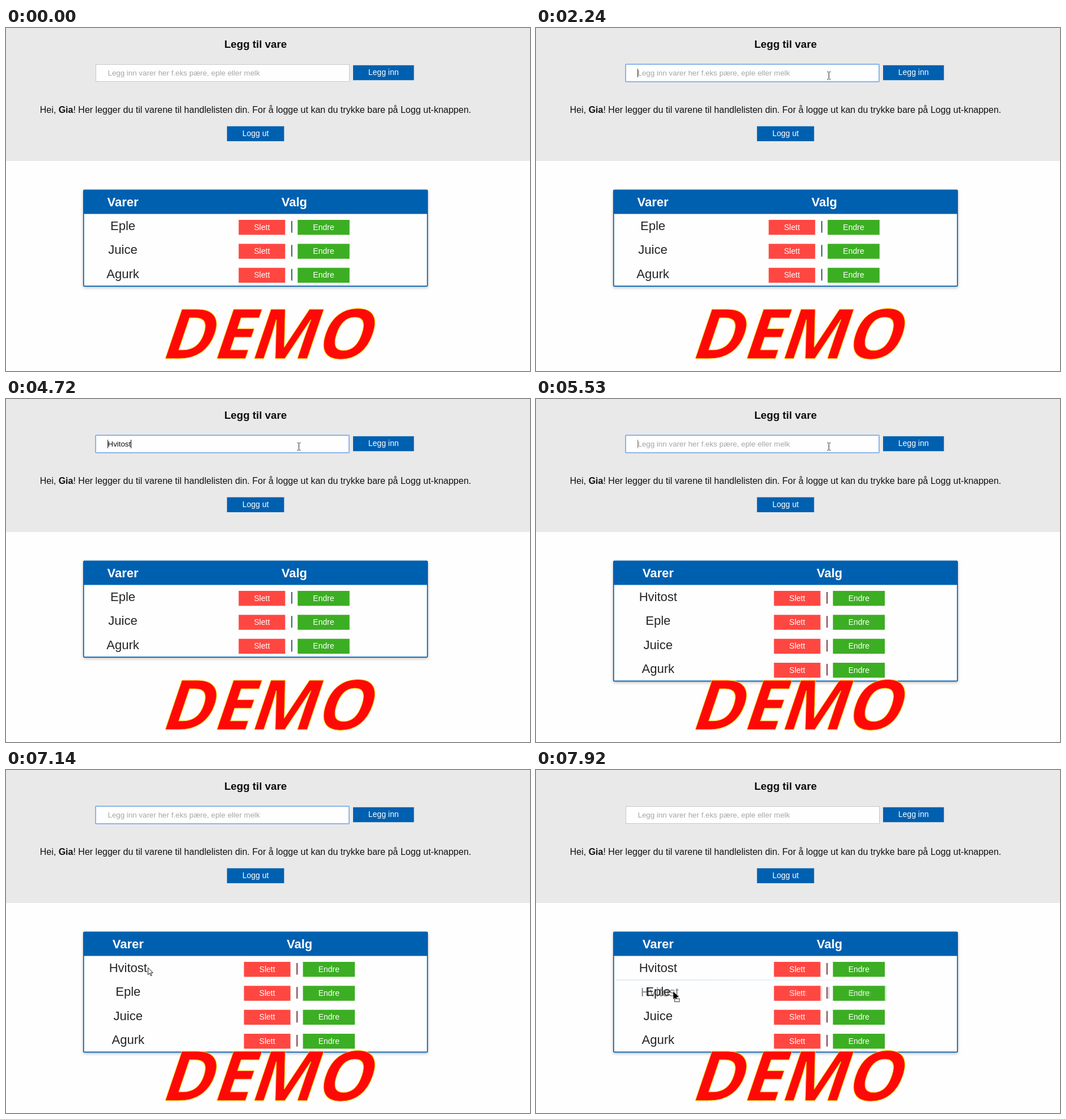
Write an HTML page that moves like this. It is 924 by 606 pixels and loops after 8 s.

```html
<!DOCTYPE html>
<html lang="no">
<head>
<meta charset="utf-8">
<title>Handleliste</title>
<style>
  html, body { margin: 0; width: 100%; height: 100%; overflow: hidden; background: #fefefe; }
  svg { display: block; width: 924px; height: 606px; font-family: "Liberation Sans", Arial, sans-serif; }
  .mid { text-anchor: middle; }
  .field { font-size: 13.333px; }
  .btn { font-size: 14px; fill: #fff; text-anchor: middle; }
  .head { font-size: 22px; font-weight: bold; fill: #fff; text-anchor: middle; }
  .item { font-size: 22px; fill: #242424; text-anchor: middle; }
  .frame { filter: drop-shadow(0 2px 2.5px rgba(0, 0, 0, .25)); }
  .demo { font: bold 122px "Open Sans", "Noto Sans", sans-serif; fill: #ff0808; stroke: #f5d800; stroke-width: 1; }
</style>
</head>
<body>
<svg id="stage" viewBox="0 0 924 606">
  <defs>
    <linearGradient id="fade" gradientUnits="userSpaceOnUse" x1="138" y1="0" x2="615" y2="0">
      <stop offset="0" stop-color="#9cc4e4" stop-opacity=".6"/>
      <stop offset=".3" stop-color="#9cc4e4" stop-opacity=".6"/>
      <stop offset="1" stop-color="#9cc4e4" stop-opacity=".1"/>
    </linearGradient>
    <path id="arrow" d="M.5 .5V13L3.4 10.3L5.4 15L7.3 14.2L5.3 9.6H9.2Z"/>
  </defs>
  <rect width="924" height="606" fill="#fefefe"/>
  <rect width="924" height="235" fill="#e9e9e9"/>
  <text class="mid" x="440" y="35" font-size="18.72" font-weight="bold" fill="#0c0c0c">Legg til vare</text>

  <rect id="box" x="158.5" y="64.5" width="447" height="30" fill="#fefefe" stroke="#c8c8c8"/>
  <rect id="ring" x="158" y="64" width="447" height="31" rx="1" fill="#fefefe" stroke="#8cb4ea" stroke-width="2"/>
  <text id="hint" class="field" x="179.5" y="84" fill="#a6a6a6">Legg inn varer her f.eks pære, eple eller melk</text>
  <text id="typed" class="field" x="179.5" y="84" fill="#111"></text>
  <rect id="home" x="179" y="72" width="1" height="15"/>
  <rect id="caret" y="72" width="1" height="15" fill="#111"/>

  <text class="mid" x="440" y="149.5" font-size="16" fill="#111">Hei, <tspan font-weight="bold">Gia</tspan>! Her legger du til varene til handlelisten din. For å logge ut kan du trykke bare på Logg ut-knappen.</text>
  <g id="buttons"></g>
  <g id="before"></g>
  <g id="after"></g>
  <text class="demo" transform="translate(0 583.5) skewX(-18.6)" x="270 361 427 542" y="0">DEMO</text>

  <g id="ghost"></g>
  <use id="pointer" href="#arrow" fill="#fff" stroke="#111" stroke-width=".95"/>
  <path id="beam" d="M513.5 77.5H515.5L516.5 78.5L517.5 77.5H519.5M516.5 78.5V89.5M513.5 90.5H515.5L516.5 89.5L517.5 90.5H519.5" fill="none" stroke="#222"/>
  <g id="drag">
    <use href="#arrow" fill="#000" stroke="#000" stroke-width=".6"/>
    <rect x="2.5" y="12.5" width="8.5" height="5.5" fill="#eee" stroke="#444"/>
  </g>
</svg>
<script>
  const el = id => document.getElementById(id);
  const BLUE = "#0060b0", RED = "#ff4742", GREEN = "#3cae23";
  const LOOP = 8000, STEP = 77, PITCH = 42.33;

  const rect = (x, y, w, h, fill, more = "") =>
    `<rect x="${x}" y="${y}" width="${w}" height="${h}" fill="${fill}" ${more}/>`;
  const text = (cls, x, y, s, more = "") =>
    `<text class="${cls}" x="${x}" y="${y}" ${more}>${s}</text>`;
  const button = (x, y, w, fill, label) =>
    rect(x, y, w, 26.4, fill) + text("btn", x + w / 2, y + 17.6, label);

  function choices(x, y, bar) {
    return button(x, y, 82, RED, "Slett") +
      rect(x + 92.7, y + 2, 1.9, 20.6, bar) +
      button(x + 104, y, 91.5, GREEN, "Endre");
  }

  function table(items, dx, bar) {
    const h = 44.4 + items.length * PITCH;
    const rows = items.map((name, i) => {
      const y = 339 + i * PITCH;
      return text("item", 206 + dx, y + 18, name) + choices(410.3 + dx, y, bar);
    });
    return rect(136.8, 286.3, 606.4, h - 1.6, "#fefefe",
        `class="frame" rx="1.5" stroke="${BLUE}" stroke-width="1.7"`) +
      rect(136.5, 286, 607, 42.5, BLUE, 'rx="1.5"') +
      text("head", 206 + dx, 315, "Varer") + text("head", 508.4 + dx, 315, "Valg") +
      rows.join("");
  }

  el("buttons").innerHTML = button(612, 65.8, 107.3, BLUE, "Legg inn") +
    button(389.7, 173.6, 100.7, BLUE, "Logg ut");
  const goods = ["Eple", "Juice", "Agurk"];
  el("before").innerHTML = table(goods, 0, "#315a62");
  el("after").innerHTML = table(["Hvitost", ...goods], 9.3, "#702f38");
  el("ghost").innerHTML = rect(138, 328, 477, 1, "url(#fade)") +
    text("item", 215.3, 357, "Hvitost", 'opacity=".55"') +
    `<g opacity=".22">${choices(419.6, 339, "#222")}</g>`;

  // Pointer moves: start time, step count, easing power, curve points.
  const moves = [
    { at: 430, n: 11, pow: 2, pts: [[846, 610], [735, 440], [657, 341]] },
    { at: 1300, n: 11, pow: 2.17, pts: [[657, 341], [605, 168], [517, 83]] },
    { at: 6310, n: 11, pow: 2.1, pts: [[516, 84], [350, 235], [252, 349]] },
    { at: 7140, n: 5, pow: 1, pts: [[252, 349], [247, 348], [239, 349]] },
    { at: 7600, n: 5, pow: 1, pts: [[239, 349], [240.5, 370], [242, 391.5]] }
  ];

  function pointerAt(t) {
    const m = moves.filter(m => t >= m.at).pop();
    if (!m) return null;
    const k = Math.min(m.n, Math.floor((t - m.at) / STEP + .2) + 1);
    const s = 1 - (1 - k / m.n) ** m.pow;
    const [a, b, c] = m.pts;
    return [0, 1].map(i => (1 - s) ** 2 * a[i] + 2 * s * (1 - s) * b[i] + s * s * c[i]);
  }

  const WORD = "Hvitost", KEYS = [3320, 3660, 3950, 4100, 4330, 4480, 4720];
  const show = (id, on) => el(id).setAttribute("display", on ? "inline" : "none");
  const place = (id, x, y) => el(id).setAttribute("transform", `translate(${x} ${y})`);

  function draw(t) {
    const within = (a, b) => t >= a && t < b;
    const typing = within(3320, 5190), focus = within(2240, 7450);
    const beam = within(2160, 6310), dragging = t >= 7600;

    show("box", !focus);
    show("ring", focus);
    show("hint", !typing);
    show("home", within(2240, 6310));
    el("home").setAttribute("fill", t < 5190 ? "#222" : "#777");
    show("typed", typing);
    show("caret", typing);
    if (typing) {
      el("typed").textContent = WORD.slice(0, KEYS.filter(k => t >= k).length);
      el("caret").setAttribute("x", Math.floor(179.5 + el("typed").getComputedTextLength()));
    }

    show("before", t < 5530);
    show("after", t >= 5530);

    const pos = pointerAt(t);
    show("pointer", pos && !beam && !dragging);
    show("beam", beam);
    show("drag", dragging);
    show("ghost", dragging);
    if (pos) {
      place("pointer", ...pos);
      place("drag", ...pos);
      place("ghost", pos[0] - 239, pos[1] - 349);
    }
  }

  function tick() {
    draw(performance.now() % LOOP);
    requestAnimationFrame(tick);
  }
  tick();
</script>
</body>
</html>
```
